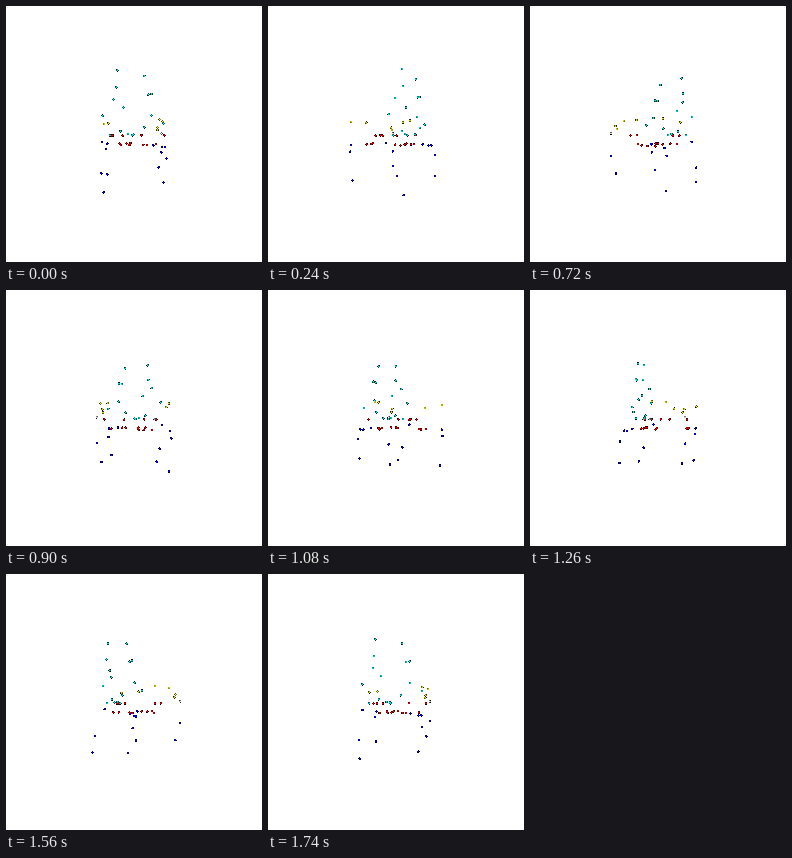
Animation, 256 px wide and 256 px high, one loop 1800 ms. Source, as a matplotlib script:

```python
import numpy as np
import matplotlib.pyplot as plt
from matplotlib.animation import FuncAnimation

SIZE = 256
FRAMES = 30
INTERVAL = 60
FOCAL = SIZE / 2 / np.tan(np.radians(30))  # 60 degree field of view
RADIUS = 1.28

# Chair parts: (x, depth, height), pixels from the turning axis, height down.
BACK = [
    (-15, 21, -57.7), (9.5, 17.5, -53.5), (-15.8, 22.3, -42),
    (13.2, 17.2, -36.4), (16.2, 17, -37), (-19, 16, -32),
    (-9.5, 20.9, -24), (16.4, 14.1, -17.4), (-28.9, 17.7, -16.8),
    (9.2, 22.5, -6), (-12.4, 18.3, -2.5), (27.5, 15.5, -9.8),
    (-0.5, 24, 0.4), (-5.5, 16.5, -0.1), (-1.7, 16, 1.2),
    (-22.3, 17, 1.3),
]
ARMS = [
    (-29.5, -34, -12.3), (-31, -9, -10.4), (30.8, -17, -13.4),
    (26, -2.8, -14.7), (27, -32, -7.5), (26.7, -30.5, -4.7),
]
TIP = [(31.5, -33.5, -0.6)]
SEAT = [
    (30, 2, 1.3), (8.5, -31, 1.4), (-21.8, -6.3, 1.5),
    (-10.7, 10.5, 1.5), (-22.3, 4, 1.5),
    (-16, -26, 10.6), (-8.5, -27.5, 10.6), (-4, 2.5, 10.4),
    (22.4, -4.9, 10.4), (8.8, 12.2, 10.3), (12.5, 13, 10.3),
    (-4.8, 15.3, 10), (-12.2, 16.5, 10.3), (-4, -30, 10),
]
LEGS = [
    (-29.7, 15, 7.6), (-32, -32.2, 17.4), (-30.5, -33, 11.2),
    (-28.7, 27, 34.5), (-26, 31.8, 50), (-30.3, -30.8, 46),
    (31.5, -33.5, 21), (28, -30.3, 38), (28.6, 27.2, 21.5),
    (25.5, 29.4, 42), (27.5, 23.7, 11.6), (25, 22, 11.8),
    (17.5, 20, 10.3),
]
PARTS = [
    (BACK, (0, 1, 1)), (ARMS, (1, 1, 0)), (TIP, (1, 1, 1)),
    (SEAT, (1, 0, 0)), (LEGS, (0, 0, 1)),
]
POINTS = np.array([p for part, _ in PARTS for p in part], float)
COLORS = np.array([c for part, c in PARTS for _ in part], float)


def project(angle):
    """Screen x, y and depth of every point for one turn angle."""
    x, y, z = POINTS.T
    near = y * np.cos(angle) - x * np.sin(angle)
    scale = FOCAL / (FOCAL - near)
    u = SIZE / 2 + scale * (x * np.cos(angle) + y * np.sin(angle))
    v = SIZE / 2 + scale * z
    return u, v, near


def render(i):
    """Splat soft discs front to back; only untouched pixels stay white."""
    u, v, near = project(2 * np.pi * i / FRAMES)
    img = np.zeros((SIZE, SIZE, 3))
    free = np.ones((SIZE, SIZE))
    for n in np.argsort(-near):
        px, py = int(u[n]), int(v[n])
        rows, cols = np.mgrid[py - 2:py + 3, px - 2:px + 3]
        dist2 = (cols + 0.5 - u[n]) ** 2 + (rows + 0.5 - v[n]) ** 2
        alpha = np.clip(1 - dist2 / RADIUS ** 2, 0, 1)
        img[rows, cols] += (alpha * free[rows, cols])[..., None] * COLORS[n]
        free[rows, cols] *= 1 - alpha
    img[free == 1] = 1
    return np.clip(img, 0, 1)


fig = plt.figure(figsize=(SIZE / 100, SIZE / 100), dpi=100, facecolor="white")
ax = fig.add_axes([0, 0, 1, 1])
ax.axis("off")
view = ax.imshow(render(0), interpolation="nearest", aspect="auto")


def update(i):
    view.set_data(render(i))
    return [view]


anim = FuncAnimation(fig, update, frames=FRAMES, interval=INTERVAL,
                     repeat=True, repeat_delay=0)
plt.show()
```
